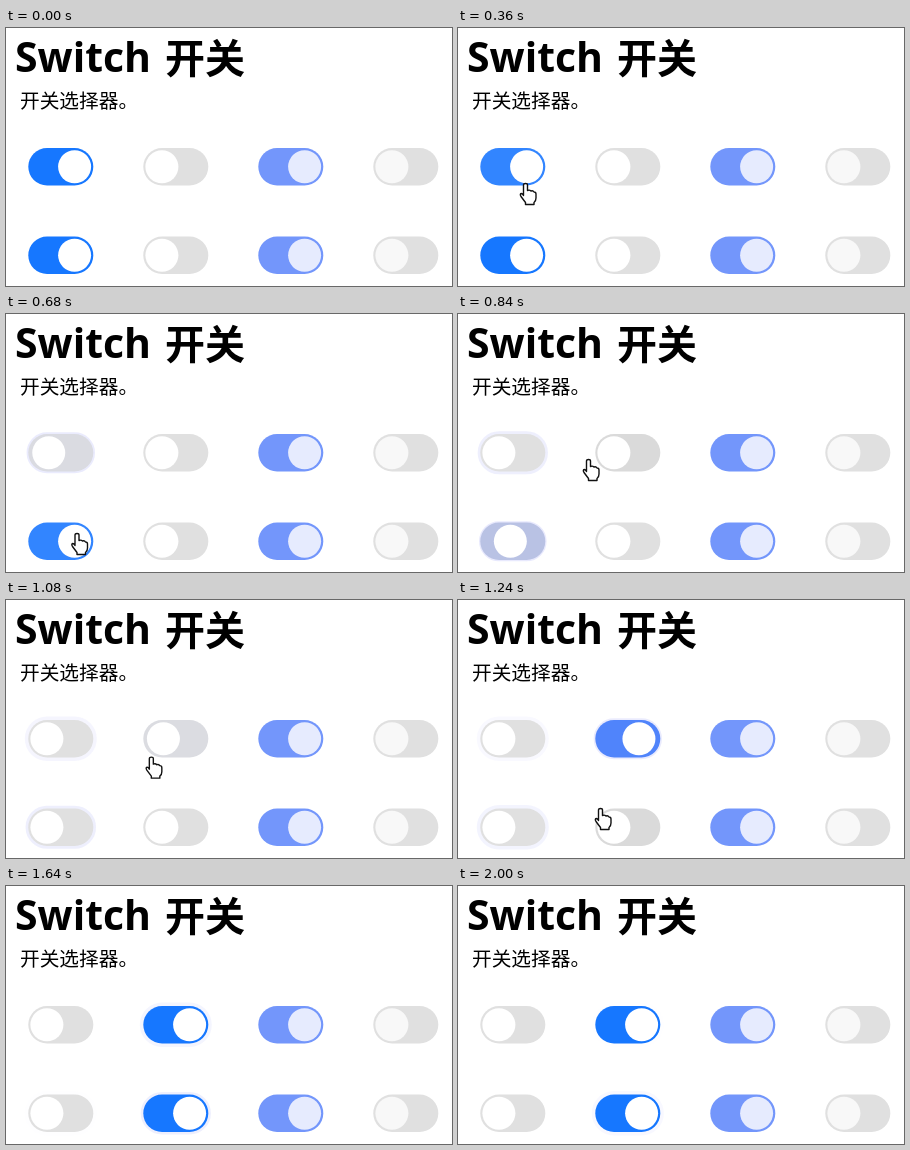
An HTML page that plays this animation: 446 px wide and 258 px high, repeating every 2.16 s.

```html
<!DOCTYPE html>
<html lang="zh-CN">
<head>
<meta charset="utf-8">
<title>Switch 开关</title>
<style>
html, body { margin: 0; width: 100%; height: 100%; overflow: hidden; background: #fff; }
svg { display: block; width: 100vw; height: 100vh; }
text { fill: #000; font-family: "Noto Sans CJK SC", "Noto Sans CJK", sans-serif; }
.title { font-size: 40px; font-weight: 700; }
.latin { font-size: 41px; font-family: "Open Sans", "Noto Sans", sans-serif; }
.sub { font-size: 19.7px; }
.cursor path { fill: #fff; stroke: #111; stroke-width: 1.4; stroke-linejoin: round; stroke-linecap: round; }
</style>
</head>
<body>
<svg viewBox="0 0 446 258">
  <defs>
    <filter id="soft" filterUnits="userSpaceOnUse" x="0" y="100" width="446" height="158" color-interpolation-filters="sRGB">
      <feGaussianBlur stdDeviation="0.45"/>
    </filter>
  </defs>
  <text class="title latin" x="9" y="43.500">Switch</text>
  <text class="title" x="159" y="45">开关</text>
  <text class="sub" x="14" y="79.500">开关选择器。</text>
  <g id="switches" filter="url(#soft)"></g>
  <g class="cursor" id="hand">
    <path d="M-2 12.500V2Q-2 .5 0 .5Q2 .5 2 2V7.500Q4 6.500 5.500 8Q7.500 7.200 8.500 9Q10.500 9 10.500 11V15Q10.500 18 8.500 19.500V21.500H0V19.500L-4.500 13.500Q-6 11 -4.200 10.500Q-3 10.500 -2 12.500Z"/>
  </g>
  <g class="cursor" id="arrow">
    <path d="M1 2.500Q1 0 3 1.400L13.500 12.500Q15 14.500 12.500 14.500H8.500L4 19.500Q1.200 21.500 1 18.500Z"/>
  </g>
</svg>
<script>
const LOOP = 2160, SLIDE = 240, FADE = 1000;
const W = 65, H = 37.5, OFF_X = 18.6, ON_X = 46.3;
const OFF = [224, 224, 224], ACTIVE = [78, 131, 251], ON = [22, 119, 255];
const HALF = [168, 180, 230];
const HOVER_OFF = [218, 218, 218], HOVER_ON = [50, 133, 255];

// The picture refreshes in uneven steps.
const ticks = [0, 160, 200, 280, 360, 480, 520, 600, 680];
for (let t = 760; t <= 1720; t += 80) ticks.push(t);
ticks.push(2000);

// Pointer hot spot: time, x, y.
const path = [
  [160, 80, 172], [280, 71, 158], [360, 67.500, 155], [480, 66, 158],
  [520, 65, 165], [600, 67, 193], [680, 71, 219], [760, 92, 203],
  [840, 130.500, 145], [920, 141, 142], [1040, 146, 146], [1160, 144, 178],
  [1240, 142.500, 208], [1320, 142, 215], [1480, 135.500, 218.500], [1550, 135, 219]
];

const ns = "http://www.w3.org/2000/svg";
const mix = (a, b, k) => a + (b - a) * k;
const blend = (a, b, k) => a.map((v, i) => mix(v, b[i], k));
const rgb = c => `rgb(${c.map(Math.round)})`;
const clamp = v => Math.min(1, Math.max(0, v));
const smooth = u => u * u * (3 - 2 * u);
const set = (el, attrs) => { for (const k in attrs) el.setAttribute(k, attrs[k]); };

function add(tag, attrs, parent) {
  const el = document.createElementNS(ns, tag);
  set(el, attrs);
  return parent.appendChild(el);
}

function makeSwitch(x, y, on, start, disabled) {
  const g = add("g", { transform: `translate(${x + 0.3} ${y})` }, document.getElementById("switches"));
  const box = { width: W, height: H, rx: H / 2 };
  const halo = add("rect", { ...box, fill: "none", stroke: "#e0e2fc", opacity: 0 }, g);
  const track = add("rect", { ...box, fill: on ? "#7396fb" : "#e0e0e0" }, g);
  const knob = add("circle", {
    cx: on ? ON_X : OFF_X, cy: H / 2, r: 16.5,
    fill: disabled ? (on ? "#e6ebfe" : "#f8f8f8") : "#fff"
  }, g);
  return { x, y, on, start, halo, track, knob };
}

const switches = [];
[[120, 478, 1046], [208.5, 706, 1286]].forEach(([y, first, second]) => {
  switches.push(makeSwitch(22, y, true, first), makeSwitch(137, y, false, second));
  makeSwitch(252, y, true, 0, true);
  makeSwitch(367, y, false, 0, true);
});

function pointerAt(t) {
  const i = path.findIndex(p => p[0] > t);
  if (i < 1) return null;
  const [a, b] = [path[i - 1], path[i]];
  const k = (t - a[0]) / (b[0] - a[0]);
  return { x: mix(a[1], b[1], k), y: mix(a[2], b[2], k) };
}

const over = (p, s) => p && p.x > s.x - 8 && p.x < s.x + W && p.y > s.y - 1 && p.y < s.y + H;

function trackColor(p, hover) {
  if (p === 0) return hover ? HOVER_OFF : OFF;
  if (p === 1) return hover ? HOVER_ON : ON;
  return p < 0.6 ? blend(OFF, HALF, p / 0.6) : blend(HALF, ACTIVE, clamp((p - 0.6) / 0.31));
}

function drawSwitch(s, t, hover) {
  const moved = smooth(clamp((t - s.start) / SLIDE));
  const p = s.on ? 1 - moved : moved;
  set(s.track, { fill: rgb(trackColor(p, hover)) });
  set(s.knob, { cx: mix(OFF_X, ON_X, p) });
  const age = (t - s.start) / FADE;
  const lit = age > 0.1 && age < 1;
  set(s.halo, { opacity: lit ? 0.85 * (1 - age) : 0, "stroke-width": mix(1, 7, clamp(age * 2)) });
}

const hand = document.getElementById("hand");
const arrow = document.getElementById("arrow");

function draw(time) {
  const now = time % LOOP;
  const t = ticks.filter(v => v <= now).pop();
  const p = pointerAt(t);
  let hot = false;
  for (const s of switches) {
    const hover = over(p, s);
    hot = hot || hover;
    drawSwitch(s, t, hover);
  }
  const place = p ? `translate(${p.x} ${p.y})` : "";
  set(hand, { transform: place, visibility: p && hot ? "visible" : "hidden" });
  set(arrow, { transform: place, visibility: p && !hot ? "visible" : "hidden" });
}

const begin = performance.now();
function frame() {
  draw(performance.now() - begin);
  requestAnimationFrame(frame);
}
frame();
</script>
</body>
</html>
```
